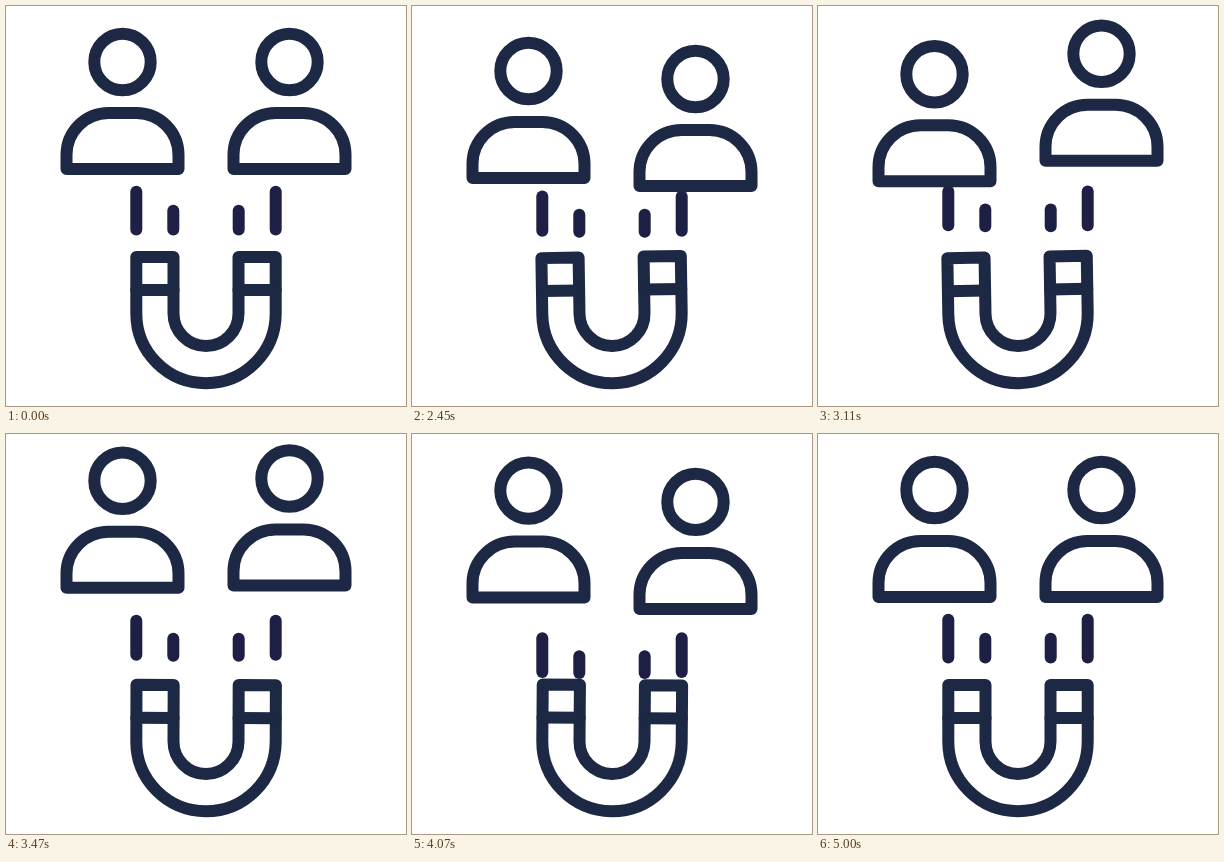
Write an HTML page with a canvas that moves like this. It is 400 px wide and 400 px high and loops after 5030 ms.

```html
<!DOCTYPE html>
<html lang="en">
<head>
<meta charset="utf-8">
<title>Magnet and people</title>
<style>
html, body { margin: 0; width: 100%; height: 100%; overflow: hidden; background: #fff; }
canvas { display: block; width: 400px; height: 400px; }
</style>
</head>
<body>
<canvas id="stage"></canvas>
<script>
const canvas = document.getElementById('stage');
const ctx = canvas.getContext('2d');
const scale = Math.max(1, window.devicePixelRatio || 1);
canvas.width = canvas.height = 400 * scale;

const LOOP = 5030, REST = 2030, MOVE = 3000, STEP = 30;
const NAVY = '#1c2844', INDIGO = '#1d1f44';
const TAU = Math.PI * 2;

// Smooth wave between 0 and 1, once per cycle.
const wave = cycles => (1 - Math.cos(TAU * cycles)) / 2;
const ease = (a, b, u) => a + (b - a) * wave(u / 2);

// Down to the peak, up past the start, down again, then home.
function sway(p, peak, down, up, again) {
  const top = -13.5;
  if (p < down) return ease(0, peak, p / down);
  if (p < up) return ease(peak, top, (p - down) / (up - down));
  if (p < again) return ease(top, peak, (p - up) / (again - up));
  return ease(peak, 0, (p - again) / (MOVE - again));
}

function line(x0, y0, x1, y1) {
  ctx.beginPath();
  ctx.moveTo(x0, y0);
  ctx.lineTo(x1, y1);
  ctx.stroke();
}

function person(x, dy) {
  ctx.save();
  ctx.translate(x, dy);
  ctx.beginPath();
  ctx.arc(0, 56, 28.2, 0, TAU);
  ctx.stroke();
  ctx.beginPath();
  ctx.moveTo(-56, 163);
  ctx.arc(-14, 149, 42, Math.PI, Math.PI * 1.5);
  ctx.arc(14, 149, 42, -Math.PI / 2, 0);
  ctx.lineTo(56, 163);
  ctx.closePath();
  ctx.stroke();
  ctx.restore();
}

function magnet(degrees) {
  const outer = 69.7, inner = 32.5, tip = -56.5, band = -23.5;
  ctx.save();
  ctx.translate(200, 307.5);
  ctx.rotate(degrees * Math.PI / 180);
  ctx.beginPath();
  ctx.moveTo(-outer, tip);
  ctx.arc(0, 0, outer, Math.PI, 0, true);
  ctx.lineTo(outer, tip);
  ctx.lineTo(inner, tip);
  ctx.arc(0, 0, inner, 0, Math.PI);
  ctx.lineTo(-inner, tip);
  ctx.closePath();
  ctx.stroke();
  for (const side of [-1, 1]) line(side * outer, band, side * inner, band);
  ctx.restore();
}

function dashes(dy, shrink) {
  for (const side of [-1, 1]) {
    const far = 200 + side * 69.7, near = 200 + side * 32.7;
    line(far, 185.6 + dy + 2 * shrink, far, 223.4 + dy - 2 * shrink);
    line(near, 204.6 + dy + shrink, near, 223.4 + dy - shrink);
  }
}

function draw(t) {
  const p = t < REST ? 0 : (Math.floor((t - REST) / STEP) + 1) * STEP;
  const edge = (2 * p / MOVE - 1) ** 6; // 1 at both ends of the motion, 0 between
  const dashCycles = 8 * p / MOVE - 0.03 + 0.16 * edge;
  const tiltCycles = 23 * p / MOVE - 0.3 * (1 - edge);

  ctx.setTransform(scale, 0, 0, scale, 0, 0);
  ctx.fillStyle = '#fff';
  ctx.fillRect(0, 0, 400, 400);
  ctx.lineWidth = 12;
  ctx.lineCap = ctx.lineJoin = 'round';

  ctx.strokeStyle = INDIGO;
  dashes(19.7 * wave(dashCycles) - 3, 1 - edge);
  ctx.strokeStyle = NAVY;
  magnet(-Math.sin(TAU * tiltCycles));
  person(116.5, sway(p, 18, 900, 1650, 2550));
  person(283.5, sway(p, 20, 600, 1290, 2450));
}

const start = performance.now();
function tick() {
  draw((performance.now() - start) % LOOP);
  requestAnimationFrame(tick);
}
tick();
</script>
</body>
</html>
```
